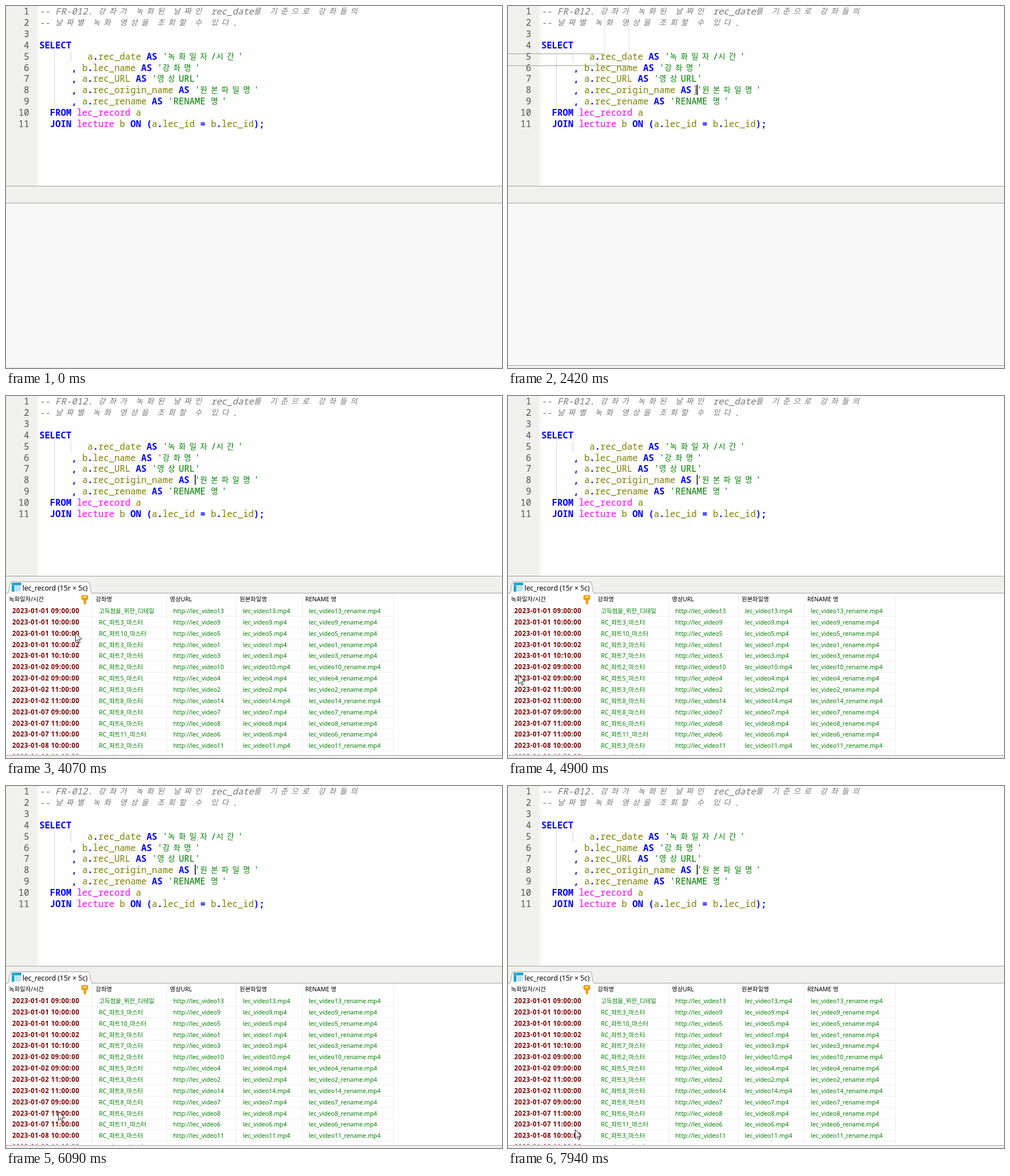
Animation, 875 px wide and 640 px high, one loop 8 s. Source, as an HTML page:

```html
<!DOCTYPE html>
<html lang="ko">
<head>
<meta charset="utf-8">
<title>SQL query</title>
<style>
html, body { margin: 0; width: 100%; height: 100%; overflow: hidden; background: #fefefe; }
svg { display: block; width: 875px; height: 640px; }
.code { font: 15.77px "Noto Sans Mono", monospace; }
.code.ko { font: 13.5px "Noto Sans CJK KR", "Noto Sans CJK", sans-serif; letter-spacing: 6.5px; }
.num { fill: #505050; text-anchor: end; }
.kw { fill: #00f; }
.code.kw { font-weight: bold; }
.code.com { fill: #787878; font-style: italic; }
.id { fill: #808000; }
.tab { fill: #f0f; }
.str { fill: #008000; }
.cell, .head, .title { font-family: "Noto Sans", "Noto Sans CJK KR", "Noto Sans CJK", sans-serif; }
.cell { font-size: 10.65px; fill: #008000; }
.date { font-size: 11.5px; font-weight: bold; letter-spacing: .5px; fill: #800000; }
.head { font-size: 10.5px; }
.title { font-size: 12.3px; }
</style>
</head>
<body>
<svg viewBox="0 0 875 640">
  <defs><clipPath id="view"><rect y="349" width="875" height="285"/></clipPath></defs>
  <rect width="875" height="640" fill="#fefefe"/>
  <rect width="55" height="318" fill="#f0f0ee"/>
  <rect x="56" width="1" height="318" fill="#ececec"/>
  <path d="M85.5 80V179M114.5 80V100" stroke="#a8a8a8" stroke-dasharray="1 1"/>
  <g id="editor"></g>
  <rect y="318" width="875" height="322" fill="#f0f0ee"/>
  <rect y="349" width="875" height="288" fill="#f8f8f8"/>
  <path d="M0 318.5H875M0 348.5H875" stroke="#a0a0a0"/>
  <g id="bottom"><rect y="635" width="875" height="5" fill="#f0f0f0"/><path d="M0 635.5H875" stroke="#a0a0a0"/></g>
  <g id="frame1" fill="none"><path d="M0 84.5H170" stroke="#a0a0a0"/><path d="M170.5 0V84" stroke="#e0e0e0"/></g>
  <g id="frame2" fill="none"><path d="M0 105.5H213" stroke="#a0a0a0"/><path d="M213.5 0V105" stroke="#e0e0e0"/></g>
  <g id="result">
    <rect y="349" width="875" height="286" fill="#fefefe"/>
    <path d="M3.5 349C6 345 6 328.5 10 328.5H145C149 328.5 148 344 151.5 349" fill="#fefefe" stroke="#a0a0a0"/>
    <rect x="10" y="330" width="17" height="16" fill="#1aa3c4"/>
    <rect x="15" y="335" width="12" height="11" fill="#dff2fb"/>
    <path d="M15 338.5H27M15 342.5H27M19 335V346M23 335V346" stroke="#8fd0ea"/>
    <path d="M10 334.5H27M14.5 330V346" stroke="#4cc4e0"/>
    <text class="title" x="29" y="344">lec_record (15r × 5c)</text>
    <rect id="hover" y="349" width="151" height="21" fill="#d9ebf9"/>
    <g id="grid" clip-path="url(#view)"></g>
    <path d="M135 352H143Q145 352 145 354V358Q145 361 141.5 361.5V367L139 369 137 367V361.5Q133 361 133 358V354Q133 352 135 352Z" fill="#eda21b"/>
    <path d="M136.5 355.5H141.5" stroke="#fff3d0" stroke-width="2"/>
  </g>
  <rect id="caret" x="333" y="139" width="1.5" height="18"/>
  <path id="ibeam" d="M-3 -7.5H-1L0 -6.5 1 -7.5H3M0 -6.5V6.5M-3 7.5H-1L0 6.5 1 7.5H3" fill="none" stroke="#222"/>
  <path id="arrow" d="M.5 .5V16.2L4.1 12.8 6.6 18.5 8.9 17.5 6.5 11.9H11.5Z" fill="#fff" stroke="#222"/>
</svg>
<script>
const NS = 'http://www.w3.org/2000/svg';
const $ = id => document.getElementById(id);
const LOOP = 8000, STEP = 69, CELL = 9.46, ROW = 19.86;
const RESULT_AT = 2490;

const SQL = `-- FR-012. 강좌가 녹화된 날짜인 rec_date를 기준으로 강좌들의
-- 날짜별 녹화 영상을 조회할 수 있다.

SELECT
         a.rec_date AS '녹화일자/시간'
      , b.lec_name AS '강좌명'
      , a.rec_URL AS '영상URL'
      , a.rec_origin_name AS '원본파일명'
      , a.rec_rename AS 'RENAME 명'
  FROM lec_record a
  JOIN lecture b ON (a.lec_id = b.lec_id);`;

const RECORDS = `01 09:00:00 고득점을_위한_디테일 13
01 10:00:00 RC_파트3_마스터 9
01 10:00:00 RC_파트10_마스터 5
01 10:00:02 RC_파트3_마스터 1
01 10:10:00 RC_파트7_마스터 3
02 09:00:00 RC_파트2_마스터 10
02 09:00:00 RC_파트5_마스터 4
02 11:00:00 RC_파트3_마스터 2
02 11:00:00 RC_파트8_마스터 14
07 09:00:00 RC_파트8_마스터 7
07 11:00:00 RC_파트6_마스터 8
07 11:00:00 RC_파트11_마스터 6
08 10:00:00 RC_파트3_마스터 11
08 11:00:00 RC_파트9_마스터 12`;

const HEADS = ['녹화일자/시간', '강좌명', '영상URL', '원본파일명', 'RENAME 명'];
const EDGES = [0, 152, 283, 406, 522, 683];

function add(parent, tag, attrs, text = '') {
  const el = document.createElementNS(NS, tag);
  for (const k in attrs) el.setAttribute(k, attrs[k]);
  el.textContent = text;
  parent.append(el);
}

const TOKEN = /(?<com>^--.*)|(?<str>'[^']*')|(?<kw>\b(?:SELECT|AS|FROM|JOIN|ON)\b|[.,()=;]+)|(?<tab>\b(?:lec_record|lecture)\b)|(?<id>\w+)/g;
const isKo = s => /[가-힣]/.test(s);
const columns = s => [...s].reduce((n, c) => n + (isKo(c) ? 2 : 1), 0);

SQL.split('\n').forEach((line, i) => {
  const y = Math.round(15.3 + i * ROW);
  add($('editor'), 'text', { class: 'code num', x: 41, y }, i + 1);
  for (const token of line.matchAll(TOKEN)) {
    const style = Object.keys(token.groups).find(k => token.groups[k]);
    for (const part of token[0].matchAll(/[가-힣]+|[^가-힣\s]+/g)) {
      const text = part[0], ko = isKo(text);
      const x = 58.7 + CELL * columns(line.slice(0, token.index + part.index));
      add($('editor'), 'text', { class: `code ${style}${ko ? ' ko' : ''}`, x, y: y - ko }, text);
    }
  }
});

function buildGrid(grid) {
  const left = c => EDGES[c] + (c ? 6 : 5);
  HEADS.forEach((name, c) => {
    add(grid, 'text', { class: 'head', x: left(c), y: 363 }, name);
    add(grid, 'rect', { x: EDGES[c + 1], y: 349, width: 1, height: 286, fill: '#ececec' });
  });
  RECORDS.split('\n').forEach((record, r) => {
    const [day, time, lecture, n] = record.split(' ');
    const y = Math.round(384 + r * ROW), video = `lec_video${n}`;
    add(grid, 'rect', { x: 0, y: y + 5, width: 683, height: 1, fill: '#f0f0f0' });
    [`2023-01-${day} ${time}`, lecture, `http://${video}`, `${video}.mp4`, `${video}_rename.mp4`]
      .forEach((text, c) => add(grid, 'text', { class: c ? 'cell' : 'cell date', x: left(c) + 6, y }, text));
  });
}
buildGrid($('grid'));

// Pointer gestures: start, end, bend point, end point.
const HOME = [838, 622];
const MOVES = [
  [120, 950, [610, 210], [331, 149]],
  [3020, 3296, [190, 420], [160, 462]],
  [3365, 4560, [130, 440], [96, 374]],
  [4620, 5180, [-46, 528], [60, 581]],
  [5180, 5573, [170, 480], [83, 363]],
  [5573, 6090, [20, 440], [94, 578]],
  [6300, 6884, [150, 545], [192, 570]],
  [6884, 7250, [150, 575], [118, 607]]
];

function pointer(t) {
  let from = HOME;
  for (const [t0, t1, bend, to] of MOVES) {
    if (t < t0) break;
    const u = Math.min(1, (t - t0) / (t1 - t0)), k = u * u * (3 - 2 * u);
    from = from.map((a, i) => (1 - k) ** 2 * a + 2 * k * (1 - k) * bend[i] + k * k * to[i]);
  }
  return from.map(Math.round);
}

// The blink starts with the click and restarts once the result is in.
function caretOn(t) {
  return t >= 1220 && (t < RESULT_AT ? (t - 1220) % 1070 < 520 : (t - 2650) % 1058 < 529);
}

function show(id, on) { $(id).style.display = on ? '' : 'none'; }

function draw(t) {
  const [x, y] = pointer(3020 + Math.floor((t - 3020) / STEP) * STEP);
  const editing = y < 318, seen = t >= 120, ready = t >= RESULT_AT;
  show('ibeam', seen && editing);
  show('arrow', seen && !editing);
  $('ibeam').setAttribute('transform', `translate(${x + .5} ${y})`);
  $('arrow').setAttribute('transform', `translate(${x} ${y})`);
  show('caret', caretOn(t));
  show('bottom', t >= 2350);
  show('frame1', t >= 2350 && !ready);
  show('frame2', t >= 2420 && !ready);
  show('result', ready);
  show('hover', y > 348 && y < 370 && x < 152);
}

const begin = performance.now();
function tick() {
  draw((performance.now() - begin) % LOOP);
  requestAnimationFrame(tick);
}
tick();
</script>
</body>
</html>
```
